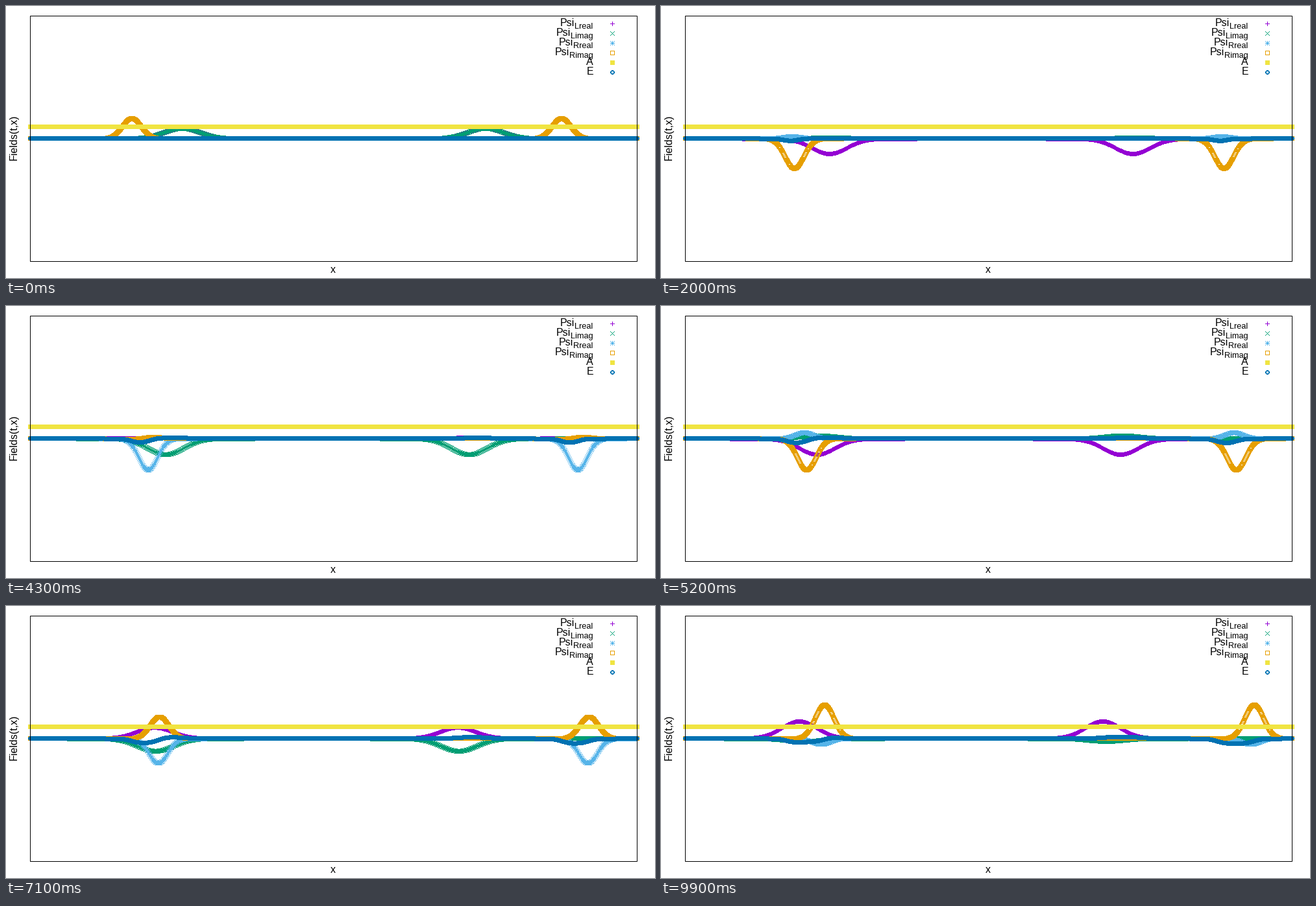
Recreate the animation shown at these times as a matplotlib script. Size 1000 px wide and 420 px high, loop 10000 ms.

```python
import math

import matplotlib.pyplot as plt
import numpy as np
from matplotlib.animation import FuncAnimation
from matplotlib.markers import MarkerStyle
from matplotlib.patches import Rectangle
from matplotlib.path import Path

PX = 0.72                      # points per pixel at 100 dpi
LEFT, RIGHT, TOP, BOTTOM = 37, 972, 15, 394
SPAN = RIGHT - LEFT
FRAMES = 100
SPEED = 0.586                  # packet speed, pixels per frame
OMEGA = math.radians(11.455)   # phase advance per frame
R_START, R_WIDTH = (193.5, 855.5), 14.4
L_START, L_WIDTH = (271.0, 738.5), 27.3
KEY_X = 934

x = np.arange(LEFT, RIGHT + 1)
erf = np.vectorize(math.erf)

plt.rcParams["font.family"] = "Liberation Sans"
fig = plt.figure(figsize=(10, 4.2), dpi=100, facecolor="white")
ax = fig.add_axes([0, 0, 1, 1])
ax.set_xlim(0, 1000)
ax.set_ylim(420, 0)
ax.axis("off")


def pixel_marker(inside):
    """Marker made of the unit cells of a 7 x 7 grid that pass a test."""
    verts, codes = [], []
    for i in range(-3, 4):
        for j in range(-3, 4):
            if inside(abs(i), abs(j)):
                verts += [(i, -j), (i + 1, -j), (i + 1, -j - 1),
                          (i, -j - 1), (i, -j)]
                codes += [Path.MOVETO] + [Path.LINETO] * 4
    return MarkerStyle(Path(verts, codes))


# name, subscript, label start, colour, marker cells
SERIES = [
    ("Psi", "Lreal", 854, "#9400D3", lambda i, j: i * j == 0),
    ("Psi", "Limag", 848, "#009E73", lambda i, j: i == j),
    ("Psi", "Rreal", 852, "#56B4E9", lambda i, j: i * j == 0 or i == j),
    ("Psi", "Rimag", 846, "#E69F00", lambda i, j: max(i, j) == 3),
    ("A", "", None, "#F0E442", lambda i, j: True),
    ("E", "", None, "#0072B2", lambda i, j: 2 <= math.hypot(i, j) < 3.2),
]

lines = []
for i, (name, sub, start, color, inside) in enumerate(SERIES):
    line, = ax.plot([], [], ls="none", marker=pixel_marker(inside), ms=8 * PX,
                    mew=0, mec="none", mfc=color, clip_on=False, zorder=2 + i)
    lines.append(line)
    base = 31 + 15 * i
    if sub:
        ax.text(start, base, name, size=16 * PX, va="baseline", zorder=20)
        ax.text(start + 22, base + 4, sub, size=12.8 * PX,
                va="baseline", zorder=20)
    else:
        ax.text(905, base, name, size=16 * PX, ha="right",
                va="baseline", zorder=20)

ax.add_patch(Rectangle((LEFT, TOP), SPAN, BOTTOM - TOP, fill=False,
                       ec="black", lw=PX, snap=True, zorder=15))
ax.text(504, 412, "x", size=16 * PX, ha="center", va="baseline")
ax.text(12, 203, "Fields(t,x)", size=16 * PX, rotation=90,
        ha="center", va="center")


def packet(starts, shift, width, phase, slope):
    """Gaussian wave packets on a ring, as a complex field."""
    total = np.zeros(len(x), complex)
    for s in starts:
        d = (x - s - shift + SPAN / 2) % SPAN - SPAN / 2
        total += np.exp(-d**2 / (2 * width**2) + 1j * (phase + slope * d))
    return total


def trail(starts, shift, width):
    """Charge swept past each point while the packets moved by shift."""
    total = np.zeros(len(x))
    for s in starts:
        total += erf((x - s) / width) - erf((x - s - shift) / width)
    return total / 2


def rows(offset):
    return 204 - np.floor(offset + 1.2e-4)


def draw(t):
    amp = 44.2 + 0.1 * t - 0.00012 * t * t
    phase = math.pi / 4 + OMEGA * t
    move = SPEED * t
    right = amp * packet(R_START, move, R_WIDTH, phase,
                         -0.0042 * min(1, t / 70))
    left = 0.51 * amp * packet(L_START, -move, L_WIDTH,
                               math.pi / 2 - phase, -0.0012 * t / FRAMES)
    field = -7.4 * trail(R_START, move, R_WIDTH) \
        - 3.3 * trail(L_START, -move, L_WIDTH)
    offsets = [left.real, left.imag, right.real, right.imag,
               np.full(len(x), 18.0), field]
    for i, (line, off) in enumerate(zip(lines, offsets)):
        line.set_data(np.append(x, KEY_X), np.append(rows(off), 27 + 15 * i))
    return lines


anim = FuncAnimation(fig, draw, frames=FRAMES, interval=100, repeat=True,
                     repeat_delay=0, init_func=lambda: draw(0))
plt.show()
```
